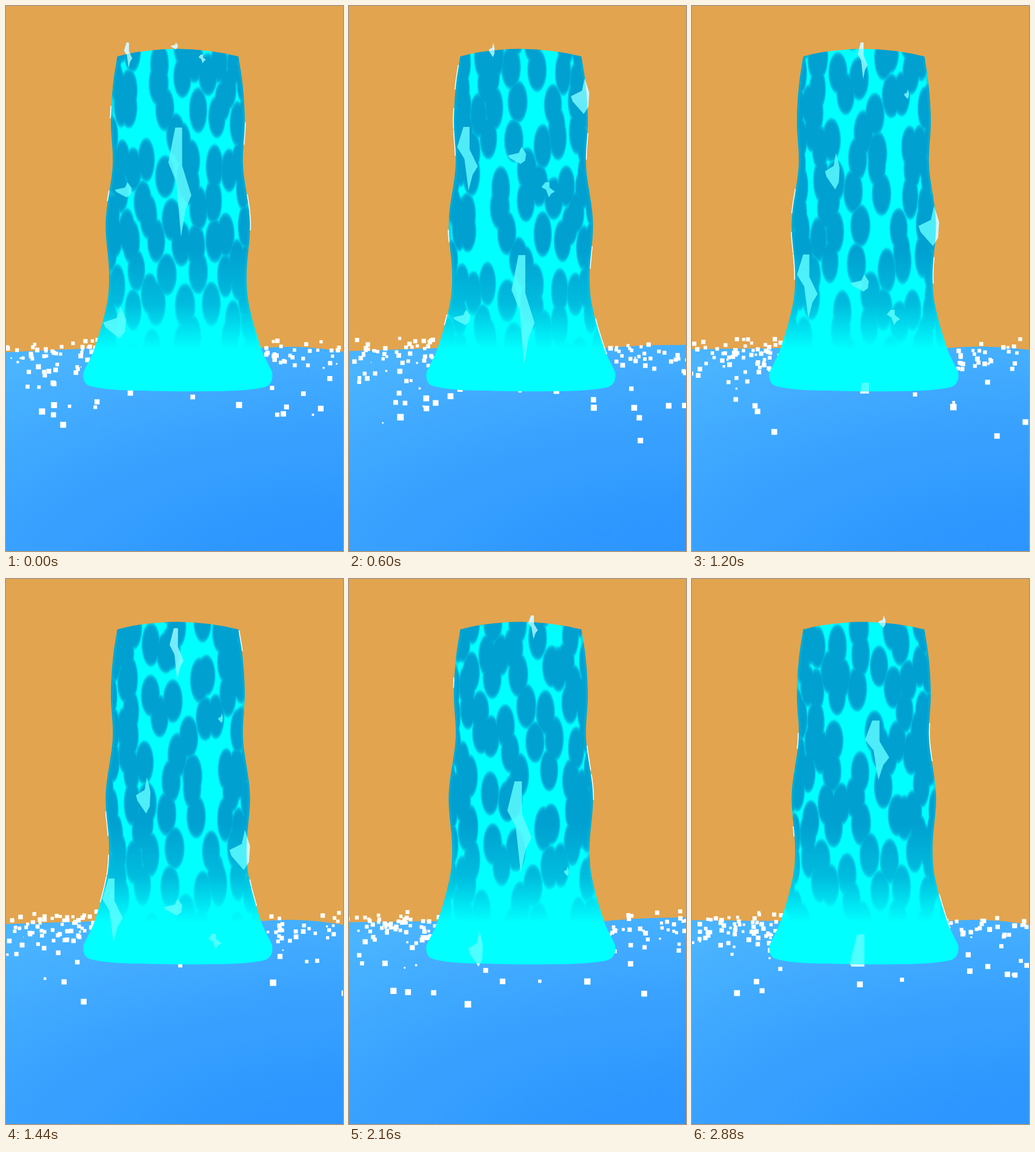
Write an HTML page that moves like this. It is 556 px wide and 897 px high and loops after 3 s.

```html
<!DOCTYPE html>
<html lang="en">
<head>
<meta charset="utf-8">
<title>Waterfall</title>
<style>
html, body { margin: 0; width: 100%; height: 100%; overflow: hidden; background: #e2a44e; }
svg { display: block; width: 556px; height: 897px; }
#fall { isolation: isolate; }
#cells ellipse { mix-blend-mode: darken; fill: url(#cell); }
</style>
</head>
<body>
<svg viewBox="0 0 556 897">
  <defs>
    <radialGradient id="cell">
      <stop offset="0" stop-color="#00a0d0"/>
      <stop offset=".74" stop-color="#00a0d0"/>
      <stop offset=".87" stop-color="#00b8de"/>
      <stop offset="1" stop-color="#0ff"/>
    </radialGradient>
    <radialGradient id="water" gradientUnits="userSpaceOnUse" cx="0" cy="0" r="1"
      gradientTransform="translate(600 950) scale(1000 430)">
      <stop offset="0" stop-color="#2b92ff"/>
      <stop offset=".3" stop-color="#2f98ff"/>
      <stop offset=".65" stop-color="#3aa3ff"/>
      <stop offset="1" stop-color="#4ab4ff"/>
    </radialGradient>
    <linearGradient id="fade" gradientUnits="userSpaceOnUse" x1="0" y1="400" x2="0" y2="565">
      <stop offset="0" stop-color="#0ff" stop-opacity="0"/>
      <stop offset=".55" stop-color="#0ff" stop-opacity=".3"/>
      <stop offset="1" stop-color="#0ff"/>
    </linearGradient>
    <linearGradient id="glint" gradientUnits="userSpaceOnUse" x1="0" y1="55" x2="0" y2="640">
      <stop offset="0" stop-color="#c8f4ff"/>
      <stop offset=".08" stop-color="#8cf8ff"/>
      <stop offset=".3" stop-color="#5cf8ff"/>
      <stop offset="1" stop-color="#5cffff"/>
    </linearGradient>
    <clipPath id="inside"><path class="outline"/></clipPath>
    <clipPath id="above"><rect width="556" height="638"/></clipPath>
  </defs>
  <rect width="556" height="897" fill="#e2a44e"/>
  <path id="sea" fill="url(#water)"/>
  <g id="drops" fill="#fff"></g>
  <g clip-path="url(#above)">
    <g id="spray" fill="#d4f4fb"></g>
    <path id="rim" fill="none" stroke="#fff" stroke-width="3"/>
  </g>
  <g id="fall" clip-path="url(#inside)">
    <path class="outline" fill="#0ff"/>
    <g id="cells"></g>
    <path id="shade" fill="none" stroke="#00b4da" stroke-width="8" stroke-opacity=".45"/>
    <rect y="400" width="556" height="240" fill="url(#fade)"/>
    <g id="glints" fill="url(#glint)" fill-opacity=".85"></g>
  </g>
</svg>
<script>
const LOOP = 3000, STEP = 120, FLOW = .34, MID = 283.5;
const { PI, sin, cos, min, max, floor, ceil, abs } = Math;
const $ = id => document.getElementById(id);
const rand = (i, k) => { const s = sin(i * 127.1 + k * 311.7) * 43758.5453; return s - floor(s); };
const mix = (a, b, p) => a + (b - a) * p;

// Half width of the column: a few key points joined smoothly
const profile = [[83, 100], [130, 107], [190, 110.5], [262, 107.5], [355, 119], [440, 113.5], [490, 117], [565, 138], [602, 155.5]];
function half(y) {
  const n = profile.length - 1;
  if (y <= profile[0][0]) return profile[0][1];
  if (y >= profile[n][0]) return profile[n][1];
  const i = profile.findIndex(k => k[0] > y) - 1;
  const slope = j => {
    const [a, b] = [profile[max(0, j - 1)], profile[min(n, j + 1)]];
    return (b[1] - a[1]) / (b[0] - a[0]);
  };
  const [y0, a] = profile[i], [y1, b] = profile[i + 1];
  const w = y1 - y0, p = (y - y0) / w, q = 1 - p;
  return a * (1 + 2 * p) * q * q + slope(i) * w * p * q * q + b * p * p * (3 - 2 * p) - slope(i + 1) * w * p * p * q;
}

// Line down (or up) one side of the column: side is -1 or 1
function trace(side, from, to) {
  const n = max(1, ceil(abs(to - from) / 6));
  return Array.from({ length: n + 1 }, (_, i) => {
    const y = mix(from, to, i / n);
    return (MID + side * half(y)).toFixed(1) + ' ' + y.toFixed(1);
  }).join('L');
}

const outline = 'M' + trace(-1, 83, 602) + 'Q125 620 137 625Q165 633 225 633Q283 635 340 634Q400 634 428 627Q442 621 439 602L' +
  trace(1, 602, 83) + 'Q335 71 283 70.5Q225 71 183.5 83Z';
document.querySelectorAll('.outline').forEach(p => p.setAttribute('d', outline));
$('shade').setAttribute('d', 'M' + trace(-1, 90, 500) + 'M' + trace(1, 90, 575));

// Dark cells scroll down around the column
function drawCells(t) {
  const pitch = 54, cols = 9, shift = FLOW * t;
  let out = '';
  for (let r = floor((-20 - shift) / pitch); r * pitch + shift < 600; r++) {
    for (let c = 0; c < cols; c++) {
      const id = r * cols + c + 900;
      const y = (r + rand(id, 1)) * pitch + shift;
      const a = ((c + rand(id, 2)) / cols - .5) * PI;
      const x = MID + half(y) * sin(a);
      const rx = 9 + 7 * cos(a) + 2 * rand(id, 3), ry = 36 + 4 * rand(id, 4);
      out += `<ellipse cx="${x.toFixed(1)}" cy="${y.toFixed(1)}" rx="${rx.toFixed(1)}" ry="${ry.toFixed(1)}"/>`;
    }
  }
  $('cells').innerHTML = out;
}

// Foam shards: two unit shapes that swell out at the top edge, then ride the flow
const sliver = [[-.2, 0], [.1, 0], [.1, .35], [.5, .62], [.25, .75], [.05, 1], [-.15, .5], [-.5, .32]];
const kite = [[-.5, .5], [.1, .35], [.25, 0], [.5, .4], [.45, .8], [.2, 1], [-.4, .65]];
const shards = [
  { form: sliver, at: 0, y: 200, u: .03, w: 38, h: 180 },
  { form: sliver, at: 0, y: 80, u: .4, w: 22, h: 25 },
  { form: kite, at: 0, y: 290, u: -.8, w: 28, h: 25 },
  { form: kite, at: 0, y: 495, u: -.84, w: 38, h: 52 },
  { form: sliver, at: 840, y: 283, u: -.82, w: 34, h: 105 },
  { form: kite, at: 840, y: 203, u: .9, w: 34, h: 66 },
  { form: kite, at: 1200, y: 137, u: .65, w: 8, h: 16 },
  { form: sliver, at: 1680, y: 165, u: -.02, w: 40, h: 150 },
  { form: kite, at: 1680, y: 410, u: -.48, w: 24, h: 60 },
  { form: kite, at: 1680, y: 610, u: -.06, w: 30, h: 28 },
  { form: sliver, at: 2880, y: 233, u: .2, w: 40, h: 98 },
  { form: kite, at: 2880, y: 57, u: .3, w: 30, h: 50 }
];
function drawShards(t) {
  $('spray').innerHTML = $('glints').innerHTML = shards.map(({ form, at, y, u, w, h }) => {
    const fall = y + (t - at) * .35;
    if (fall < -20 || fall > 640) return '';
    const top = max(60, fall), grow = min(1, .4 + (top - 60) / 120);
    const x = MID + u * half(top + h * grow / 2);
    const pts = form.map(([a, b]) => (x + a * w * grow).toFixed(1) + ',' + (top + b * h * grow).toFixed(1));
    return `<polygon points="${pts.join(' ')}"/>`;
  }).join('');
}

// Short white rims slide down both sides
function drawRims(t) {
  let d = '';
  for (let i = 0; i < 14; i++) {
    const y = mix(-900, 560, rand(i, 8)) + FLOW * t;
    const from = max(85, y), to = min(575, y + 15 + 50 * rand(i, 9));
    if (from < to) d += 'M' + trace(i % 2 ? 1 : -1, from, to);
  }
  $('rim').setAttribute('d', d);
}

// Horizon swell, stronger away from the column
function horizon(x, t) {
  const l = max(0, 1 - x / 150), r = max(0, (x - 420) / 136);
  return 563 + l - 6 * l * cos(2 * PI * (t - 360) / 660) + 6 * r * r * cos(2 * PI * t / 1440) - 3 * sin(PI * r);
}
function drawSea(t) {
  let d = 'M0 897';
  for (let x = 0; x <= 556; x += 4) d += `L${x} ${horizon(x, t).toFixed(1)}`;
  $('sea').setAttribute('d', d + 'V897Z');
}

// Square drops hop outward; the near ones are larger and fewer
function drawDrops(t) {
  let out = '';
  for (let i = 0; i < 112; i++) {
    const life = 700 + 400 * rand(i, 1), age = t / life + rand(i, 2);
    const id = i + 200 * floor(age), p = age % 1;
    const depth = rand(id, 3) ** 5, u = rand(id, 5);
    let x = rand(id, 4) < .64 ? 155 * u ** .8 : 420 + 150 * u ** 1.3;
    if (depth > .42) x = 556 * u;
    x += (x < MID ? -1 : 1) * (p - .4) * 34;
    const y = 562 + 30 * rand(id, 6) + 135 * depth - 16 * sin(PI * p);
    const size = (5 + 2.5 * rand(id, 7) + 4 * depth) * min(1, 8 * p + .5, 9 * (1 - p) + .2);
    const s = size.toFixed(1);
    out += `<rect x="${(x - size / 2).toFixed(1)}" y="${(y - size / 2).toFixed(1)}" width="${s}" height="${s}"/>`;
  }
  $('drops').innerHTML = out;
}

function draw(t) {
  drawSea(t);
  drawDrops(t);
  drawCells(t);
  drawRims(t);
  drawShards(t);
}

let start = null, shown = -1;
function tick(now) {
  if (start === null) start = now;
  const t = floor(((now - start) % LOOP) / STEP) * STEP;
  if (t !== shown) draw(shown = t);
  requestAnimationFrame(tick);
}
draw(0);
requestAnimationFrame(tick);
</script>
</body>
</html>
```
